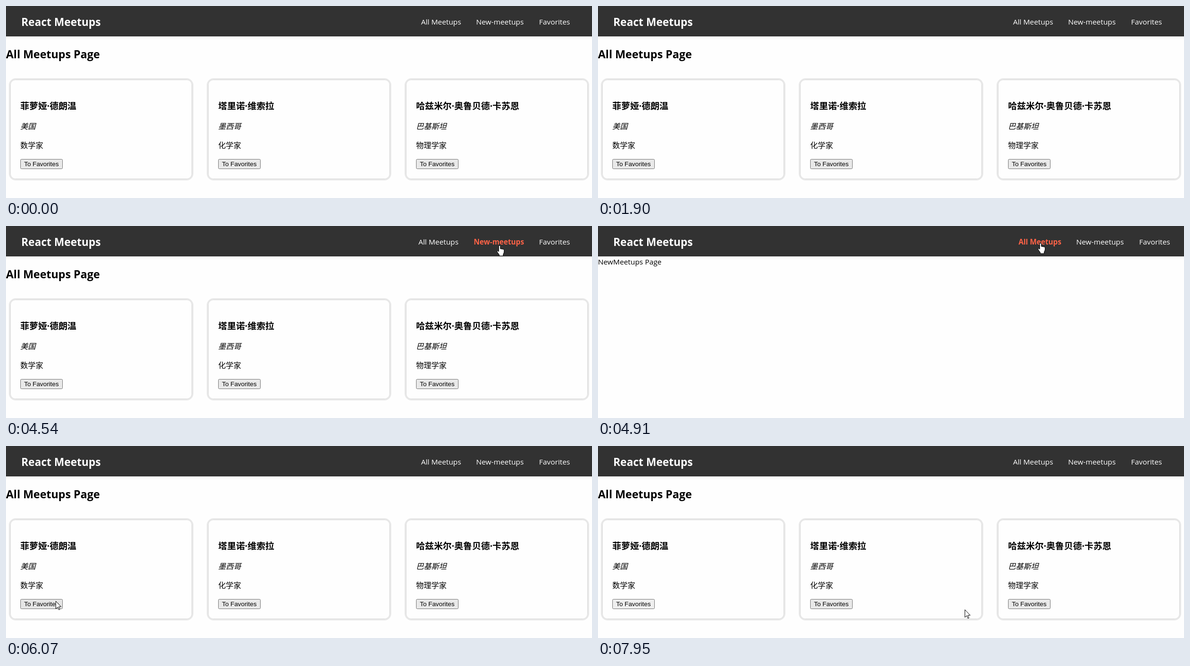
These frames come from a looping animation (1229 by 404 pixels, 8 s). An HTML page:

```html
<!DOCTYPE html>
<html lang="zh">
<head>
<meta charset="utf-8">
<title>React Meetups</title>
<style>
  html, body { margin: 0; width: 100%; height: 100%; overflow: hidden; background: #fefefe; }
  svg { display: block; width: 1229px; height: 404px; }
  text { font-family: "Open Sans", "Noto Sans CJK SC", "Noto Sans CJK", sans-serif; font-size: 15.35px; }
  .brand { font-size: 22.5px; font-weight: 700; fill: #fff; }
  .title { font-size: 23px; font-weight: 700; }
  .nav text { fill: #fff; }
  .nav .hover { fill: #ff6347; font-size: 15.2px; font-weight: 700; }
  .name { font-size: 18.72px; font-weight: 700; }
  .info { font-size: 16px; }
  .country { font-style: italic; }
  .button rect { fill: #e9e9e9; stroke: #767676; }
  .button text { font: 13.333px "Liberation Sans", Arial, sans-serif; }
  .button.fresh rect { fill: #efefef; }
  .button.hover rect { fill: #e5e5e5; }
</style>
</head>
<body>
<svg viewBox="0 0 1229 404">
  <rect width="1229" height="64" fill="#323232"/>
  <text class="brand" x="32" y="42">React Meetups</text>
  <g class="nav">
    <text y="39">All Meetups</text>
    <text y="39">New-meetups</text>
    <text y="39">Favorites</text>
  </g>
  <g id="allPage">
    <text class="title" x="0" y="110">All Meetups Page</text>
    <g id="cards"></g>
  </g>
  <text id="newPage" x="0" y="81">NewMeetups Page</text>
  <g id="cursor" stroke="#000" fill="#fff" stroke-linejoin="round">
    <path id="arrow" d="M.5 .5V16.5L4.3 13L6.8 18.7L9 17.8L6.6 12.2H11.6Z"/>
    <path id="hand" d="M-1.6 13V1.6Q0-1.6 1.8 1.6V7L4.8 7.3L7.5 8Q9.7 7.4 9.7 9.8V14L7.7 19V22H-.3V20L-5 13.2Q-4.6 8.5-1.6 13Z"/>
  </g>
</svg>
<script>
const $ = selector => document.querySelector(selector);

const people = [
  ["菲萝娅·德朗温", "美国", "数学家"],
  ["塔里诺·维索拉", "墨西哥", "化学家"],
  ["哈兹米尔·奥鲁贝德·卡苏恩", "巴基斯坦", "物理学家"],
];

$("#cards").innerHTML = people.map(([name, country, job], i) => `
  <g transform="translate(${i * 415})">
    <rect x="7.5" y="153.5" width="384" height="212" rx="13" fill="none" stroke="#e8e8e8" stroke-width="3"/>
    <rect x="9.5" y="155.5" width="380" height="208" rx="10" fill="#fefefe" stroke="#dcdcdc"/>
    <text class="name" x="30" y="217">${name}</text>
    <text class="info country" x="30" y="259">${country}</text>
    <text class="info" x="30" y="299">${job}</text>
    <g class="button">
      <rect x="30.5" y="322.5" width="88" height="20" rx="2"/>
      <text x="38" y="337">To Favorites</text>
    </g>
  </g>`).join("");

// Each stroke: start ms, then [step, x, y] points; the cursor moves once per step.
const stepTime = 50;
const strokes = [
  [90, [0, 610, 300], [4, 360, 160]],
  [430, [0, 361, 152], [3, 371, 119]],
  [890, [0, 373, 122], [5, 398, 204], [8, 340, 275], [14, 96, 145], [16, 106, 31]],
  [1730, [0, 108, 24], [4, 114, -40]],
  [2520, [0, 145, 33], [6, 480, 209], [9, 850, 160], [13, 936, 57], [15, 921, 44]],
  [3380, [0, 921, 43]],
  [3840, [0, 928, 38]],
  [4390, [0, 945, 38], [3, 1035, 41]],
  [4720, [0, 1035, 41], [3, 928, 36]],
  [5580, [0, 922, 50], [3, 815, 180], [9, 104, 326], [15, 104, 332]],
  [6410, [0, 112, 333], [6, 470, 390], [11, 690, 197], [16, 845, 345]],
  [7280, [0, 860, 365], [2, 930, 390], [6, 1079, 300], [8, 970, 264], [13, 769, 344]],
];

function cursorAt(t) {
  const stroke = strokes.findLast(([start]) => start <= t);
  if (!stroke) return [0, -40];
  const [start, ...points] = stroke;
  const last = points.at(-1)[0];
  const step = Math.min(last, Math.floor((t - start) / stepTime));
  const next = points.find(p => p[0] >= step);
  const prev = points.findLast(p => p[0] <= step);
  const k = next === prev ? 0 : (step - prev[0]) / (next[0] - prev[0]);
  return [1, 2].map(i => Math.round(prev[i] + (next[i] - prev[i]) * k));
}

const links = document.querySelectorAll(".nav text");
const buttons = document.querySelectorAll(".button");
const show = (element, on) => element.setAttribute("visibility", on ? "visible" : "hidden");
const inside = (value, low, high) => value >= low && value < high;

function render(t) {
  const [x, y] = cursorAt(t);
  const onNew = inside(t, 4720, 5370);
  const shift = onNew ? 17 : 0;
  const onLinkRow = inside(y, 22, 43);
  const overAll = onLinkRow && inside(x - shift, 865, 956);
  const overNew = onLinkRow && inside(x - shift, 982, 1087);

  show($("#allPage"), !onNew);
  show($("#newPage"), onNew);

  const lefts = [overAll || overNew ? 865 : 870.5, overNew ? 981 : 986, 1118];
  links.forEach((link, i) => {
    link.setAttribute("x", lefts[i] + shift);
    link.classList.toggle("hover", [overAll, overNew][i] || false);
  });

  buttons.forEach((button, i) => button.classList.toggle("hover",
    !onNew && inside(x - i * 415, 30, 119) && inside(y, 322, 343)));
  buttons[0].classList.toggle("fresh", t >= 6410);

  $("#cursor").setAttribute("transform", `translate(${x} ${y})`);
  show($("#hand"), overAll || overNew);
  show($("#arrow"), !overAll && !overNew);
}

const origin = performance.now();
function tick() {
  render((performance.now() - origin) % 8000);
  requestAnimationFrame(tick);
}
tick();
</script>
</body>
</html>
```
